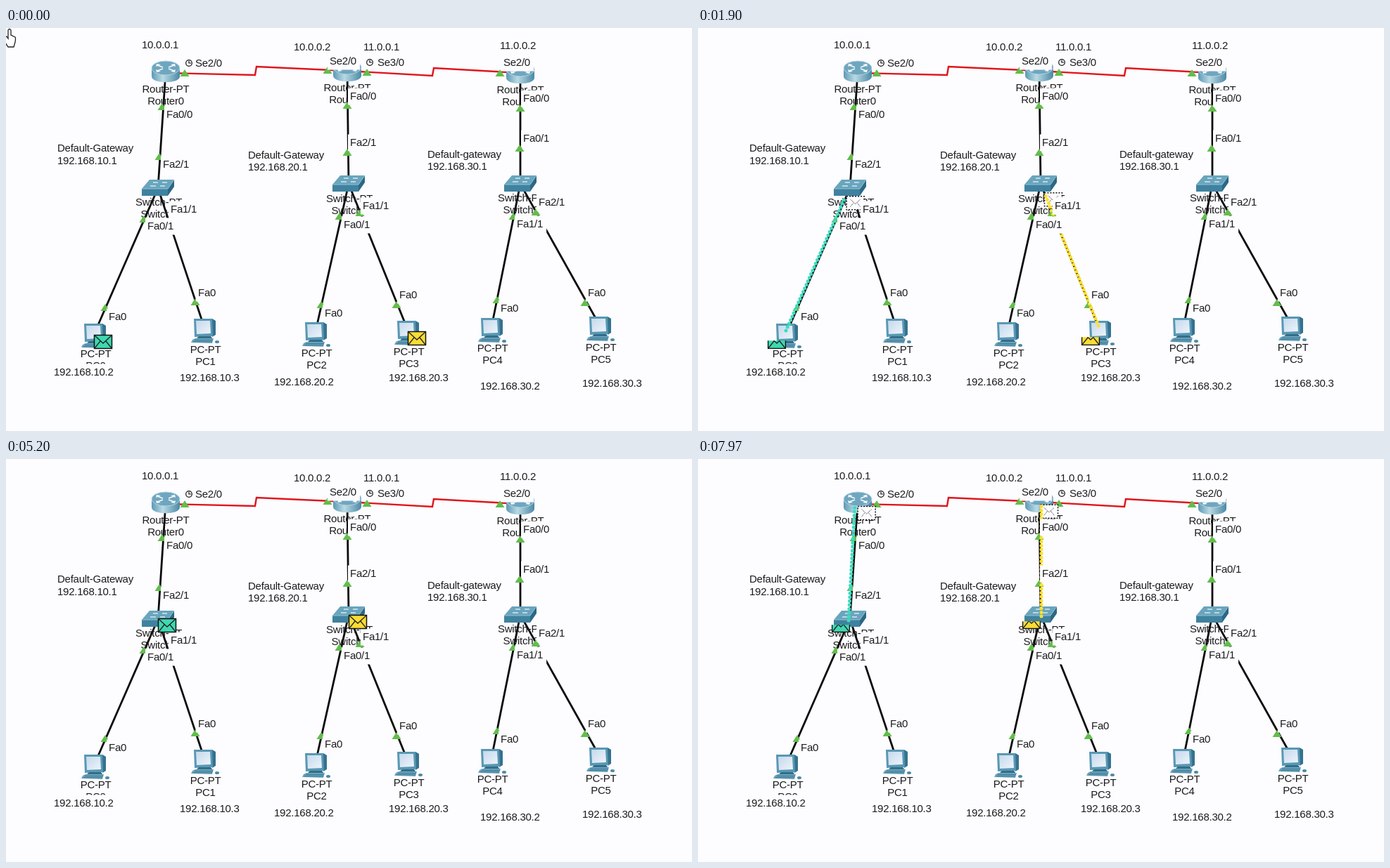
Write an HTML page that moves like this. It is 975x574 px and loops after 8000 ms.

```html
<!DOCTYPE html>
<html lang="en">
<head>
<meta charset="utf-8">
<title>Packet simulation</title>
<style>
html, body { margin: 0; width: 100%; height: 100%; overflow: hidden; background: #fdfcff; }
svg { display: block; width: 975px; height: 574px; }
text { font: 15px "Liberation Sans", Arial, sans-serif; letter-spacing: -.25px; fill: #1c1c1c; }
.mid { text-anchor: middle; }
.cable { stroke: #0a0a0a; stroke-width: 2.8; fill: none; }
.serial { stroke: #e0161b; stroke-width: 2.4; fill: none; }
.port { fill: #62bd4b; }
.thin { fill: none; stroke: #111; stroke-width: 1.2; }
.paper { fill: #fdfcff; }
.ghost rect { fill: #fdfcff; stroke: #111; stroke-width: 1.5; stroke-dasharray: 2 2; }
.ghost path { fill: none; stroke: #222; stroke-width: 1.3; stroke-dasharray: 2 1; }
.mail rect { stroke: #111; stroke-width: 1.5; }
.mail path { fill: none; stroke: #222; stroke-width: 1.3; }
</style>
</head>
<body>
<svg id="stage" viewBox="0 0 975 574">
  <defs>
    <linearGradient id="side">
      <stop offset="0" stop-color="#5c9ab5"/><stop offset=".4" stop-color="#b9d9e4"/><stop offset="1" stop-color="#4b89a5"/>
    </linearGradient>
    <linearGradient id="glass" x2="1" y2="1">
      <stop offset="0" stop-color="#c5d9ec"/><stop offset="1" stop-color="#eef4fb"/>
    </linearGradient>
    <g id="router">
      <path d="M-20-5V7C-20 18 20 18 20 7V-5Z" fill="url(#side)"/>
      <ellipse cy="-5" rx="20" ry="10" fill="#6fa6bf" stroke="#b3d3df"/>
      <path d="M-12-9L-4-6M12-9L4-6M-12-1L-4-4M12-1L4-4" stroke="#f4fafc" stroke-width="1.800"/>
      <path d="M-14-7l1-4 6 1zM14-7l-1-4-6 1zM-14-3l1 4 6-1zM14-3l-1 4-6-1z" fill="#f4fafc"/>
    </g>
    <g id="switch">
      <path d="M-23 1L-12-12H23L14 1Z" fill="#69a5bd"/>
      <path d="M-23 1H14V11H-23Z" fill="#3f829f"/>
      <path d="M14 1L23-12V-2L14 11Z" fill="#2c6885"/>
      <path d="M-7-8h7M-3-3h-8M6-8h7M3-3h7" stroke="#d5e8ef" stroke-width="1.400"/>
      <path d="M-23 1H14L23-12" fill="none" stroke="#8fc0d1"/>
    </g>
    <g id="pc">
      <path d="M11-13L16-10V10L11 13Z" fill="#35728f"/>
      <path d="M-15-13L11-13 12 12-14 13Z" fill="#5898b3"/>
      <path d="M-12-10H8L9 8-11 9Z" fill="url(#glass)"/>
      <path d="M-8 12H9L12 16H-12Z" fill="#336e8a"/>
      <path d="M-17 17L-13 15H13L11 22-19 21Z" fill="#6ba5bd"/>
      <path d="M-14 17.500h26M-16 19.700h27" stroke="#35708c" stroke-width=".9"/>
      <ellipse cx="18" cy="20" rx="3" ry="2" fill="#4b8aa5"/>
    </g>
    <g id="clock">
      <circle r="4.300" class="thin"/><path d="M0-3V0H3" class="thin"/>
    </g>
    <path id="fold" d="M-12-9L0 2 12-9M-12 9L-4-1M12 9L4-1"/>
  </defs>
</svg>
<script>
const stage = document.getElementById('stage');

function add(tag, attrs = {}, parent = stage, content = '') {
  const el = document.createElementNS('http://www.w3.org/2000/svg', tag);
  for (const key in attrs) el.setAttribute(key, attrs[key]);
  el.textContent = content;
  return parent.appendChild(el);
}
const place = (el, [x, y]) => el.setAttribute('transform', `translate(${x} ${y})`);
const show = (el, on) => el.setAttribute('visibility', on ? 'visible' : 'hidden');
const clamp = v => Math.min(1, Math.max(0, v));
const mix = (a, b, t) => [a[0] + (b[0] - a[0]) * t, a[1] + (b[1] - a[1]) * t];

const routers = [[227, 62], [485, 61], [731, 64]];
const switches = [[216, 228], [487, 222], [731, 222]];
const pcs = [[126, 434], [282, 427], [440, 432], [571, 430], [690, 426], [844, 424]];

// Cables
const cable = (a, b) => add('path', { class: 'cable', d: `M${a}L${b}` });
routers.forEach((r, i) => cable(r, switches[i]));
pcs.forEach((p, i) => cable(switches[i >> 1], p));
add('path', { class: 'serial', d: 'M227 64L354 67 356 55 485 61' });
add('path', { class: 'serial', d: 'M485 61L606 68 608 57 731 64' });

// Devices and captions
const icon = (name, at) => place(add('use', { href: '#' + name }), at);
const caption = (text, x, y) => add('text', { class: 'mid', x, y: y + 5 }, stage, text);
const device = (name, at, kind, title, x, y) => {
  icon(name, at);
  caption(kind, x, y);
  caption(title, x, y + 16.500);
};
const routerY = [87, 85, 88], switchY = [248, 243, 242], pcY = [464, 458, 463, 461, 456, 455];
routers.forEach((p, i) => device('router', p, 'Router-PT', 'Router' + i, p[0], routerY[i]));
switches.forEach((p, i) => device('switch', p, 'Switch-PT', 'Switch' + i, p[0] + 1, switchY[i]));
pcs.forEach((p, i) => device('pc', p, 'PC-PT', 'PC' + i, p[0] + 1.500, pcY[i]));

// Link lights
[[254, 64], [222, 112], [218, 183], [196, 272], [141, 398], [269, 390], [457, 60],
 [513, 63], [485, 110], [485, 177], [474, 268], [503, 263], [448, 394], [555, 394],
 [702, 64], [731, 114], [730, 171], [721, 268], [753, 262], [698, 387], [823, 391]
].forEach(at => place(add('path', { class: 'port', d: 'M0-5L6.500 5H-6.500Z' }), at));

const moving = add('g');

// Labels hide whatever lies beneath them
function label(text, x, y) {
  const back = add('rect', { class: 'paper', x: x - 3, y: y - 11.500, height: 24 });
  const el = add('text', { x, y: y + 5 }, stage, text);
  back.setAttribute('width', el.getComputedTextLength() + 8);
}
`10.0.0.1 193 24|10.0.0.2 409 27|11.0.0.1 508 27|11.0.0.2 702 25
Se2/0 269 50|Fa0/0 228 123|Fa2/1 223 194|Fa1/1 234 258|Fa0/1 201 282|Fa0 146 411|Fa0 273 377
Se2/0 460 47|Se3/0 528 49|Fa0/0 489 97|Fa2/1 489 163|Fa1/1 507 253|Fa0/1 480 280|Fa0 453 406|Fa0 559 380
Se2/0 707 49|Fa0/0 735 100|Fa0/1 735 157|Fa2/1 757 248|Fa1/1 726 279|Fa0 703 399|Fa0 827 377
Default-Gateway 73 171|Default-Gateway 344 181|Default-gateway 599 180
192.168.10.2 68 490|192.168.10.3 247 498|192.168.20.2 381 504
192.168.20.3 544 498|192.168.30.2 674 510|192.168.30.3 819 506`
  .split(/[|\n]/).forEach(row => {
    const [text, x, y] = row.split(' ');
    label(text, +x, +y);
  });
[[73, 189], [344, 198], [599, 197]].forEach(([x, y], i) =>
  add('text', { x, y: y + 5 }, stage, `192.168.${i + 1}0.1`));
icon('clock', [260, 50]);
icon('clock', [517, 49]);

// Packets: each leg is a trail with an outline travelling along it
function envelope(kind, fill, parent) {
  const g = add('g', { class: kind }, parent);
  const body = add('g', {}, g);
  add('rect', { x: -12.500, y: -9.500, width: 25, height: 19, ...(fill && { fill }) }, body);
  const fold = add('path', { d: document.getElementById('fold').getAttribute('d') }, body);
  if (kind === 'ghost') fold.setAttribute('transform', 'scale(.6)');
  return { g, body };
}

function makeTrail(a, b, fill) {
  const count = Math.round(Math.hypot(b[0] - a[0], b[1] - a[1]) / 5.500);
  return Array.from({ length: count + 1 }, (_, i) => {
    const [cx, cy] = mix(a, b, i / count);
    return { at: i / count, el: add('circle', { cx, cy, r: 2.500, fill }, moving) };
  });
}

function makePacket(color, dotColor, stops, trailStops) {
  const ghost = envelope('ghost', '', moving);
  const trails = [0, 1].map(i => makeTrail(trailStops[i], trailStops[i + 1], dotColor));
  return { stops, ghost, trails, mail: envelope('mail', color, stage) };
}
const packets = [
  makePacket('#3fd8b0', '#3ddcc0',
    [[138, 447], [229, 237], [240, 72]], [[125, 431], [214, 230], [223, 64]]),
  makePacket('#fbdc35', '#ffe12b',
    [[584, 442], [500, 232], [499, 70]], [[569, 424], [488, 224], [488, 62]])
];

const cursor = add('path', {
  d: 'M-1 13L1 12 3 15V3Q5 0 7 3V10L13 13Q14 15 13 20L11 27H3L-1 21Z',
  fill: '#fff', stroke: '#222', 'stroke-width': 1.300
});

const LOOP = 8000, LEG = 6000, START = 467;

function drawPacket({ stops, ghost, trails, mail }, time) {
  const leg = time < LEG ? 0 : 1;
  const t = time - leg * LEG - START;
  const travelling = t >= 33 && t < 1683;
  const arrived = t >= 1683;
  const head = t < 33 ? -1 : 1 - (1 - clamp(t / 1600)) ** 1.250;
  const tail = t < 1700 ? 0 : t < 2830 ? clamp((t - 1700) / 800) * .93 : 2;
  const [x, y] = stops[leg + (arrived ? 1 : 0)];

  place(mail.g, travelling ? [x - 26, y] : [x, y]);
  const drain = travelling ? clamp((t - 863) / 800) * 58 : 0;
  mail.body.style.clipPath = drain ? `inset(${drain}% 0 0 0)` : 'none';

  show(ghost.g, travelling);
  place(ghost.g, mix(stops[leg], stops[leg + 1], Math.max(0, head)));
  trails.forEach((dots, i) => dots.forEach(dot =>
    show(dot.el, i === leg && dot.at <= head && dot.at >= tail)));
}

function draw(now) {
  const time = now % LOOP;
  show(cursor, time < 100);
  packets.forEach(p => drawPacket(p, time));
}

const origin = performance.now();
function tick() {
  draw(performance.now() - origin);
  requestAnimationFrame(tick);
}
tick();
</script>
</body>
</html>
```
